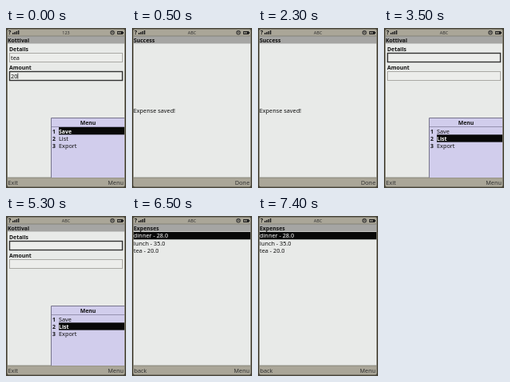
Recreate the animation shown at these times as an HTML page. Size 150 px wide and 200 px high, loop 8 s.

```html
<!DOCTYPE html>
<html lang="en">
<head>
<meta charset="utf-8">
<title>Expense form</title>
<style>
html, body { margin: 0; width: 100%; height: 100%; overflow: hidden; background: #49463b; }
svg { display: block; width: 100vw; height: 100vh; }
text { font: 7.3px "Noto Sans", "Open Sans", sans-serif; fill: #111; }
.b { font-size: 6.9px; font-weight: 700; }
.s { font-size: 5.4px; fill: #333; }
.bar { fill: #333; }
.inv { fill: #fff; }
.mid { text-anchor: middle; }
.end { text-anchor: end; }
.field { fill: #ecedeb; stroke: #aaa9a5; }
.focus { fill: none; stroke: #333; stroke-width: 1.4; }
.entry, .done, .form, .list { visibility: hidden; animation: 8s step-end infinite; }
.entry { animation-name: entry; }
.done { animation-name: done; }
.form { animation-name: form; }
.list { animation-name: list; }
@keyframes entry { 0% { visibility: visible } 6.25%, 100% { visibility: hidden } }
@keyframes done { 0% { visibility: hidden } 6.25% { visibility: visible } 43.75%, 100% { visibility: hidden } }
@keyframes form { 0% { visibility: hidden } 43.75% { visibility: visible } 81.25%, 100% { visibility: hidden } }
@keyframes list { 0% { visibility: hidden } 81.25%, 100% { visibility: visible } }
</style>
</head>
<body>
<svg viewBox="0 0 150 200" preserveAspectRatio="none">
  <defs>
    <g id="form">
      <text class="b" x="2" y="17.7">Kottival</text>
      <text class="b" x="4" y="29.3">Details</text>
      <rect class="field" x="4.5" y="31.5" width="141" height="11"/>
      <text class="b" x="4" y="52.3">Amount</text>
      <rect class="field" x="4.5" y="54.5" width="141" height="11"/>
      <path d="M57 187V113H148V187Z" fill="#d1cdec"/>
      <path d="M56.5 187V112.5H148" fill="none" stroke="#77748c"/>
      <path d="M57 123.5H148" stroke="#9692b0"/>
      <text class="b mid" x="102.5" y="121">Menu</text>
      <text class="b" x="58" y="131.5">1</text>
      <text class="b" x="58" y="140.8">2</text>
      <text class="b" x="58" y="150">3</text>
      <text x="66" y="150">Export</text>
      <text class="bar" x="2.5" y="195.8">Exit</text>
      <text class="bar end" x="147" y="195.8">Menu</text>
    </g>
    <g id="abc"><text class="s mid" x="75" y="8">ABC</text></g>
  </defs>

  <rect width="150" height="200" fill="#49463b"/>
  <rect x="1.5" y="1.5" width="147" height="197" rx="2" fill="#aaa698"/>
  <rect x="2" y="10" width="146" height="177" fill="#e8eae8"/>
  <rect x="2" y="10" width="146" height="9.5" fill="#a5a5a3"/>
  <path d="M2 10H148M2 187H148" stroke="#7d7a70" stroke-width=".8"/>

  <g fill="#222">
    <text class="b" x="3" y="8.2">?</text>
    <path d="M8 8V6H9.5V8ZM10.3 8V5H11.8V8ZM12.6 8V4H14.1V8ZM14.9 8V3H16.4V8Z"/>
    <circle cx="133" cy="5.8" r="2.2" fill="none" stroke="#333" stroke-width="1.1"/>
    <circle cx="133" cy="5.8" r=".7"/>
    <path d="M139 4H146V5H147V7H146V8H139Z"/>
    <path d="M140 5H141.3V7H140ZM142 5H143.3V7H142Z" fill="#aaa698"/>
  </g>

  <g class="entry">
    <text class="s mid" x="75" y="8">123</text>
    <use href="#form"/>
    <text x="6" y="39.5">tea</text>
    <rect class="focus" x="4.5" y="54.5" width="141" height="11"/>
    <text x="6" y="62.5">20</text>
    <path d="M14.8 56.5V63.5" stroke="#222" stroke-width=".8"/>
    <rect x="66" y="124" width="82" height="9.3" fill="#080808"/>
    <text class="b inv" x="66" y="131.5">Save</text>
    <text x="66" y="140.8">List</text>
  </g>

  <g class="done">
    <use href="#abc"/>
    <text class="b" x="2" y="17.7">Success</text>
    <text x="1.7" y="106">Expense saved!</text>
    <text class="bar end" x="147" y="195.8">Done</text>
  </g>

  <g class="form">
    <use href="#abc"/>
    <use href="#form"/>
    <rect class="focus" x="4.5" y="31.5" width="141" height="11"/>
    <rect x="66" y="133.3" width="82" height="9.3" fill="#080808"/>
    <text x="66" y="131.5">Save</text>
    <text class="b inv" x="66" y="140.8">List</text>
  </g>

  <g class="list">
    <use href="#abc"/>
    <text class="b" x="2" y="17.7">Expenses</text>
    <rect x="2" y="20" width="146" height="9.3" fill="#080808"/>
    <text class="inv" x="2" y="27.3">dinner - 28.0</text>
    <text x="2" y="36.5">lunch - 35.0</text>
    <text x="2" y="45.7">tea - 20.0</text>
    <text class="bar" x="2.5" y="195.8">back</text>
    <text class="bar end" x="147" y="195.8">Menu</text>
  </g>
</svg>
</body>
</html>
```
